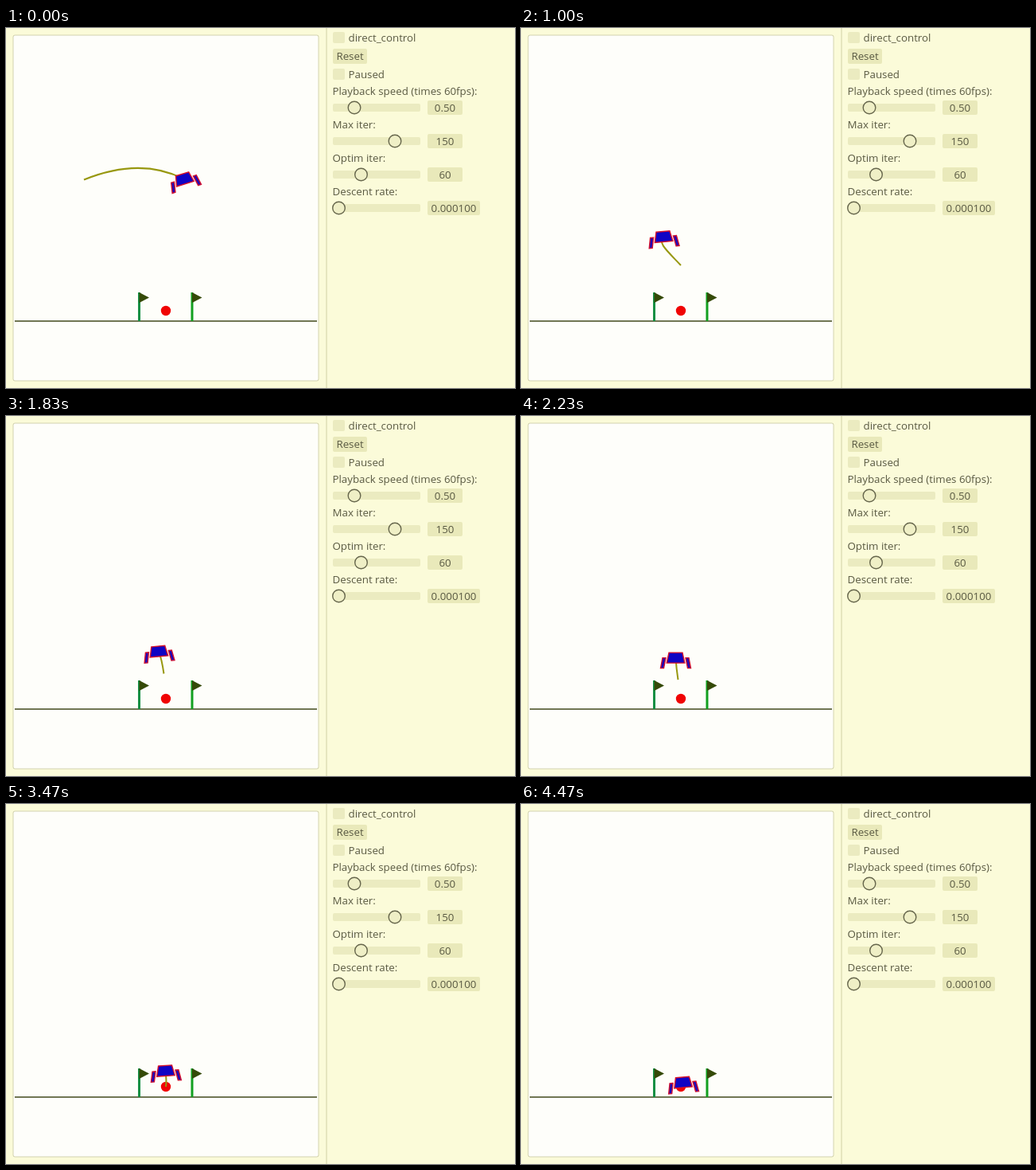
Write an HTML page with a canvas that moves like this. It is 640x452 px and loops after 4.51 s.

```html
<!DOCTYPE html>
<html lang="en">
<head>
<meta charset="utf-8">
<title>Lander</title>
<style>
html, body { margin: 0; width: 100%; height: 100%; overflow: hidden; background: #fbfbd9; }
canvas { display: block; }
</style>
</head>
<body>
<canvas id="stage" width="640" height="452"></canvas>
<script>
const ctx = document.getElementById('stage').getContext('2d');
const LOOP = 4510, STEP = 1000 / 30;

// time, centre x/y, tilt in degrees, then path handles and end
const KEYS = [
  [0, 223.5, 189.5, -17, 187, 171, 146, 171, 98, 190.5],
  [570, 194, 229, 2, 160, 232, 160, 238, 203, 248],
  [1000, 179, 262, -5, 172, 270, 182, 278, 201, 298],
  [1430, 187, 286, -10, 194, 290, 197, 297, 200, 316],
  [2230, 194.5, 303.5, 0, 195, 312, 196, 321, 197.5, 331],
  [2770, 195, 318, 1, 196, 328, 198, 341, 200.5, 355],
  [3470, 200.5, 335, -4, 201.5, 343, 202, 349, 201, 355],
  [4470, 203.5, 349.5, -5, 203, 351, 202, 353, 201, 355]
];

// Smooth interpolation that never overshoots a key
function slope(i, c) {
  if (i === 0 || i === KEYS.length - 1) {
    const j = Math.min(i, KEYS.length - 2);
    return (KEYS[j + 1][c] - KEYS[j][c]) / (KEYS[j + 1][0] - KEYS[j][0]);
  }
  const [a, b, d] = [KEYS[i - 1], KEYS[i], KEYS[i + 1]];
  const m = (b[c] - a[c]) / (b[0] - a[0]), n = (d[c] - b[c]) / (d[0] - b[0]);
  return m * n <= 0 ? 0 : 2 * m * n / (m + n);
}

function sample(t) {
  let i = 0;
  while (i < KEYS.length - 2 && t > KEYS[i + 1][0]) i++;
  const a = KEYS[i], b = KEYS[i + 1], span = b[0] - a[0];
  const u = Math.min(1, (t - a[0]) / span), v = 1 - u;
  return a.slice(1).map((p, k) => {
    const c = k + 1;
    return v * v * (1 + 2 * u) * p + u * u * (3 - 2 * u) * b[c]
      + span * u * v * (v * slope(i, c) - u * slope(i + 1, c));
  });
}

function box(x, y, w, h, color, r = 2) {
  ctx.fillStyle = color;
  ctx.beginPath();
  ctx.roundRect(x, y, w, h, r);
  ctx.fill();
}

function polygon(points, fill, stroke) {
  ctx.beginPath();
  points.forEach(([x, y]) => ctx.lineTo(x, y));
  ctx.closePath();
  ctx.fillStyle = fill;
  ctx.fill();
  if (!stroke) return;
  ctx.strokeStyle = stroke;
  ctx.lineWidth = 1.4;
  ctx.stroke();
}

function disc(x, y, r, color) {
  ctx.beginPath();
  ctx.arc(x, y, r, 0, Math.PI * 2);
  ctx.fillStyle = color;
  ctx.fill();
}

function label(text, x, y, align = 'left') {
  ctx.textAlign = align;
  ctx.fillStyle = '#595942';
  ctx.fillText(text, x, y);
}

function slider(name, value, y, knob, width) {
  label(name, 410.5, y - 16);
  box(411, y - 5, 110, 10, '#ebebc0');
  disc(knob, y, 7.8, '#efefc6');
  ctx.strokeStyle = '#66664c';
  ctx.lineWidth = 1.4;
  ctx.stroke();
  box(530, y - 9, width, 18, '#e9e9ba');
  label(value, 530 + width / 2, y + 5, 'center');
}

function panel() {
  ctx.fillStyle = '#fbfbd9';
  ctx.fillRect(0, 0, 640, 452);
  ctx.fillStyle = '#e6e6bf';
  ctx.fillRect(402, 0, 2, 452);
  box(8.5, 8.5, 385, 435, '#d4d4b0', 3);
  box(9.5, 9.5, 383, 433, '#fefefa', 2);
  ctx.font = '13.3px "Open Sans", sans-serif';
  box(411, 5, 15, 14, '#ebebc0');
  label('direct_control', 430.5, 17);
  box(411, 26, 43, 19, '#e9e9ba');
  label('Reset', 432.5, 40, 'center');
  box(411, 51, 15, 14, '#ebebc0');
  label('Paused', 430.5, 63);
  slider('Playback speed (times 60fps):', '0.50', 100, 438, 44);
  slider('Max iter:', '150', 142, 489, 44);
  slider('Optim iter:', '60', 184, 446.5, 44);
  slider('Descent rate:', '0.000100', 226, 418.5, 66);
}

function flag(x, color) {
  ctx.fillStyle = color;
  ctx.fillRect(x - 1.5, 332, 3, 36);
  polygon([[x, 332], [x + 12.5, 338.5], [x, 345]], '#354a08');
}

function leg(side) {
  const s = side;
  polygon([[s * 12.5, 0], [s * 16.5, 0], [s * 19, 13], [s * 15, 13]], '#1c08b8', '#d01030');
}

function lander([x, y, tilt]) {
  ctx.save();
  ctx.translate(x, y);
  ctx.rotate(tilt * Math.PI / 180);
  leg(-1);
  leg(1);
  polygon([[-8.5, -6.5], [8.5, -6.5], [11.3, 6.5], [-11.3, 6.5]], '#1004c4', '#d81028');
  ctx.restore();
}

function draw(time) {
  const t = Math.floor((time % LOOP) / STEP + 0.1) * STEP;
  const pose = sample(t);
  panel();
  ctx.fillStyle = '#707653';
  ctx.fillRect(11, 367, 380, 2);
  flag(167.5, '#149044');
  flag(234, '#12a020');
  disc(201, 355, 6.2, '#f00404');
  ctx.beginPath();
  ctx.moveTo(pose[0], pose[1]);
  ctx.bezierCurveTo(...pose.slice(3));
  ctx.strokeStyle = '#989810';
  ctx.lineWidth = 2;
  ctx.stroke();
  lander(pose);
}

const start = performance.now();
function tick() {
  draw(performance.now() - start);
  requestAnimationFrame(tick);
}
tick();
</script>
</body>
</html>
```
